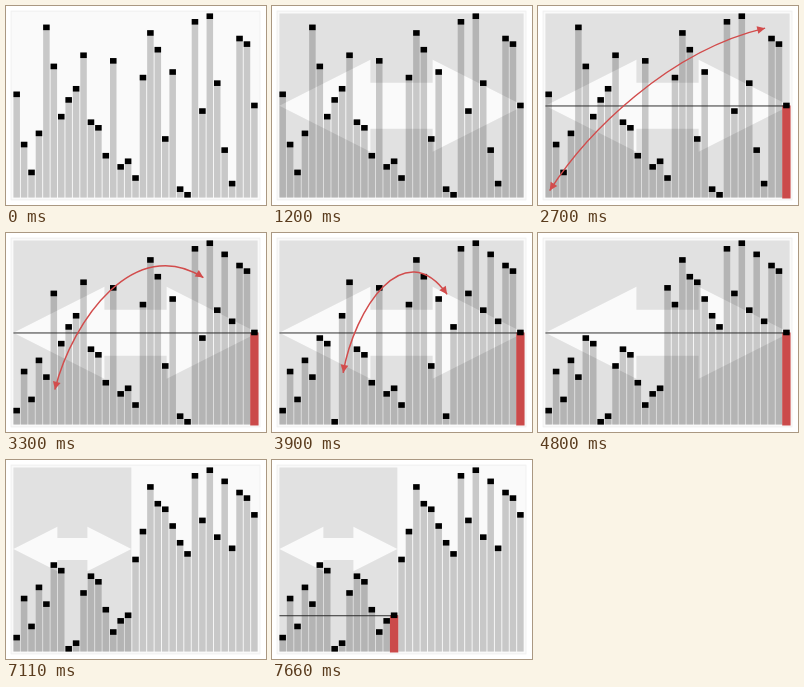
Write an HTML page with a canvas that moves like this. It is 260x199 px and loops after 8 s.

```html
<!DOCTYPE html>
<html lang="en">
<head>
<meta charset="utf-8">
<title>Quicksort partition</title>
<style>
html, body { margin: 0; width: 100%; height: 100%; overflow: hidden; background: #fff; }
canvas { display: block; }
</style>
</head>
<body>
<canvas id="stage" width="260" height="199"></canvas>
<script>
const ctx = document.getElementById('stage').getContext('2d');
const LOOP = 8000, STEP = 300, LAST_SWAP = 4500, PIVOT_SWAP = 6110;
const LEFT = 8, TOP = 8, FLOOR = 206, RED = '#cb4a4a', ARROW = '#d24c4c';

// Rank of each bar, 0 being the tallest
const ranks = [14, 23, 28, 21, 2, 9, 18, 15, 13, 7, 19, 20, 25, 8, 27, 26, 29,
  11, 3, 6, 22, 10, 31, 32, 1, 17, 0, 12, 24, 30, 4, 5, 16];

// All drawing happens on a 280 x 214 grid: bars 7 wide every 8, ranks 6 apart
ctx.scale(260 / 280, 199 / 214);
const barX = i => LEFT + 8 * i;
const rankY = r => TOP + 6 * r;

// Pairs exchanged while partitioning around the last bar
function partition() {
  const last = ranks.length - 1, pivot = ranks[last], pairs = [];
  for (let i = 0, j = last - 1; ; i++, j--) {
    while (ranks[i] > pivot) i++;
    while (ranks[j] < pivot) j--;
    if (i >= j) return { pairs, home: i > j ? j + 1 : i, last, pivot };
    pairs.push([i, j]);
  }
}
const { pairs, home, last, pivot } = partition();
const swaps = pairs.map(([a, b], n) => [Math.min(3000 + STEP * n, LAST_SWAP), a, b]);
swaps.push([PIVOT_SWAP, home, last]);

function barsAt(t) {
  const bars = [...ranks];
  for (const [at, a, b] of swaps)
    if (t >= at) [bars[a], bars[b]] = [bars[b], bars[a]];
  return bars;
}

function rect(color, x, y, w, h) {
  ctx.fillStyle = color;
  ctx.fillRect(x, y, w, h);
}

// Shade bars up to the given one, leaving a double arrow clear
function shade(to, cy) {
  const width = barX(to) + 7 - LEFT, mid = LEFT + width / 2, k = width / 263;
  const half = [[-131.5, 0], [-33.5, -49.5], [-33.5, -24.7]];
  const upper = [...half, ...half.map(([x, y]) => [-x, y]).reverse()];
  const lower = upper.map(([x, y]) => [x, -y]).reverse();
  ctx.beginPath();
  ctx.rect(LEFT, TOP, width, FLOOR - TOP);
  [...upper, ...lower].forEach(([x, y], i) =>
    ctx[i ? 'lineTo' : 'moveTo'](mid + x * k, cy + y * k));
  ctx.closePath();
  ctx.fillStyle = 'rgba(0,0,0,.1)';
  ctx.fill('evenodd');
}

function markPivot(index, rank, to) {
  const y = rankY(rank) + 3;
  rect(RED, barX(index) - 1, y, 9, FLOOR + 1 - y);
  rect('#222', LEFT, y, barX(to) + 7 - LEFT, 1);
}

function head([x, y], [fromX, fromY]) {
  ctx.save();
  ctx.translate(x, y);
  ctx.rotate(Math.atan2(y - fromY, x - fromX));
  ctx.beginPath();
  ctx.moveTo(0, 0);
  ctx.lineTo(-8.5, -4.2);
  ctx.lineTo(-8.5, 4.2);
  ctx.fill();
  ctx.restore();
}

// Double-headed arc, highest towards its end
function arc(a, b, lift) {
  const dx = b[0] - a[0], dy = b[1] - a[1], length = Math.hypot(dx, dy);
  const ux = dx / length, uy = dy / length, up = Math.sign(ux);
  const reach = 215 * (1 - Math.exp(-length / 129));
  const control = (along, out) =>
    [a[0] + ux * along + up * uy * out, a[1] + uy * along - up * ux * out];
  const c = control(0.36 * reach, 0.6 * lift), d = control(reach, lift);
  ctx.strokeStyle = ctx.fillStyle = ARROW;
  ctx.lineWidth = 1.6;
  ctx.beginPath();
  ctx.moveTo(...a);
  ctx.bezierCurveTo(...c, ...d, ...b);
  ctx.stroke();
  head(a, c);
  head(b, d);
}

// Arrow tips lie on the rising diagonal of the chart
function swapArrow([i, j]) {
  const tip = n => [barX(n) + 4.6, 208 - 0.753 * (barX(n) + 4.6)];
  arc(tip(i), tip(j), 84 * Math.sin(Math.PI * (j - i) / 35));
}

function draw(now) {
  const t = now % LOOP, bars = barsAt(t);
  rect('#fff', 0, 0, 280, 214);
  rect('#fafafa', 5, 5, 269, 204);
  ctx.strokeStyle = '#f0f0f0';
  ctx.lineWidth = 1;
  ctx.strokeRect(5.5, 5.5, 268, 203);

  bars.forEach((r, i) => rect('#c8c8c8', barX(i), rankY(r), 7, FLOOR - rankY(r)));

  if (t >= 7110) shade(home - 1, 95.7);
  else if (t >= 1200) shade(last, 107.3);

  if (t >= 7660) markPivot(home - 1, bars[home - 1], home - 1);
  else if (t >= 1950 && t < 7110) markPivot(t < PIVOT_SWAP ? last : home, pivot, last);

  bars.forEach((r, i) => rect('#000', barX(i), rankY(r), 7, 6));

  const turn = pairs[Math.floor((t - 2700) / STEP)];
  if (turn) swapArrow(turn);
  if (t >= 5510 && t < PIVOT_SWAP)
    arc([barX(last) + 2, 102], [barX(home) + 6, 52], 105);
}

const start = performance.now();
function tick() {
  draw(performance.now() - start);
  requestAnimationFrame(tick);
}
tick();
</script>
</body>
</html>
```
